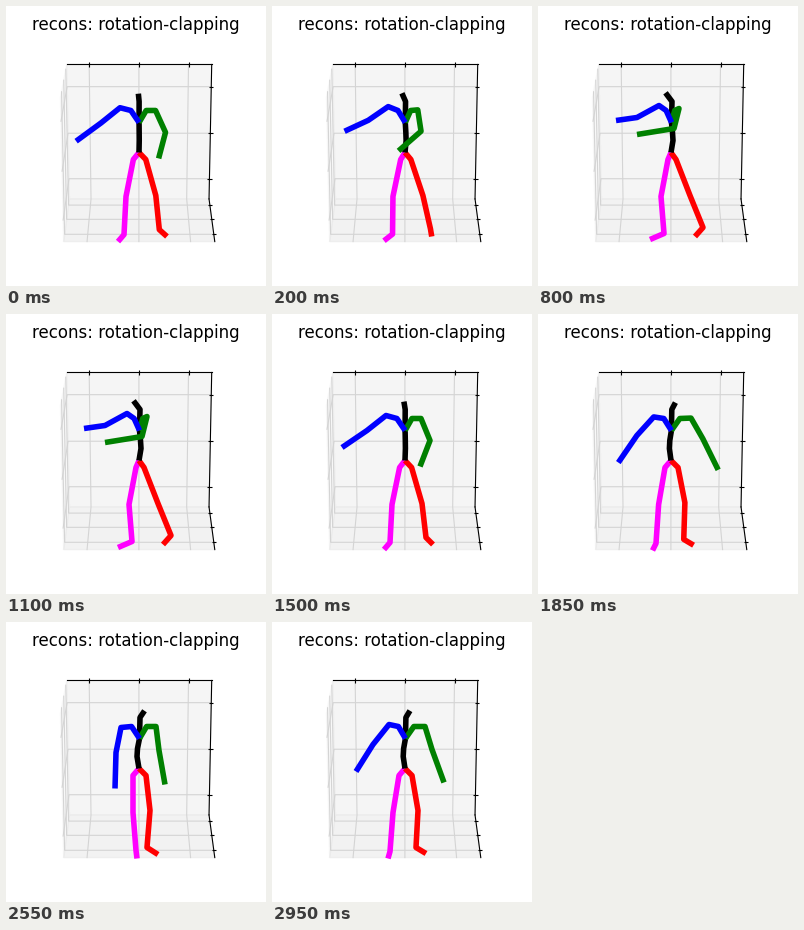
A matplotlib script that plays this animation: 260x280 px, repeating every 3 s.

```python
import numpy as np
import matplotlib.pyplot as plt
from matplotlib.animation import FuncAnimation
from matplotlib.patches import Polygon

W, H, DPI = 260, 280, 100
FRAMES, STEP = 60, 50
TILT = np.radians(20)
TICKS = (0.155, 0.498, 0.84)

plt.rcParams["font.family"] = "DejaVu Sans"
fig = plt.figure(figsize=(W / DPI, H / DPI), dpi=DPI, facecolor="white")
ax = fig.add_axes([0, 0, 1, 1])
ax.set_xlim(0, W)
ax.set_ylim(H - 0.5, -0.5)
ax.axis("off")


def project(u, v, w):
    """Unit box (right, up, towards the viewer) to stage pixels."""
    x, y, z = 1.143 * (u - 0.5), 1.143 * (v - 0.5), 0.857 * (w - 0.5)
    up = y * np.cos(TILT) - z * np.sin(TILT)
    scale = 1295 / (10 - y * np.sin(TILT) - z * np.cos(TILT))
    return 133.2 + x * scale, 144.7 - up * scale


def path(*corners, **style):
    xs, ys = zip(*(project(*c) for c in corners))
    ax.plot(xs, ys, **style)


def pane(gray, *corners):
    shade = (gray, gray, gray, 0.5)
    ax.add_patch(Polygon([project(*c) for c in corners],
                         facecolor=shade, edgecolor=shade, lw=1))


def tick(point, dx, dy):
    x, y = project(*point)
    ax.plot([x - dx, x + dx], [y - dy, y + dy], color="black", lw=0.8,
            solid_capstyle="butt")


def draw_box():
    pane(0.95, (0, 0, 0), (0, 1, 0), (0, 1, 1), (0, 0, 1))
    pane(0.90, (0, 0, 0), (1, 0, 0), (1, 0, 1), (0, 0, 1))
    pane(0.925, (0, 0, 0), (1, 0, 0), (1, 1, 0), (0, 1, 0))
    grid = dict(color="#d4d4d4", lw=0.8)
    for t in TICKS:
        path((t, 1, 0), (t, 0, 0), (t, 0, 1), **grid)
        path((1, t, 0), (0, t, 0), (0, t, 1), **grid)
        path((0, 1, t), (0, 0, t), (1, 0, t), **grid)
    edge = dict(color="black", lw=0.8)
    path((0, 1, 0), (1, 1, 0), **edge)
    path((1, 1, 0), (1, 0, 0), **edge)
    path((1, 0, 0), (1, 0, 1), **edge)
    for t in TICKS:
        tick((t, 1, 0), 0, 2.2)
        tick((1, t, 0), 2.2, 0)
        tick((1, 0, t), 2.2, 0)


def curve(stops, values):
    """Smooth curve through the values, without overshoot."""
    stops, values = np.array(stops, float), np.array(values, float)
    gaps = np.diff(stops)
    rate = (np.diff(values, axis=0).T / gaps).T
    a, b = rate[:-1], rate[1:]
    same = a * b > 0
    inner = np.where(same, 2 * a * b / np.where(same, a + b, 1), 0)
    slope = np.concatenate([rate[:1], inner, rate[-1:]])

    def at(t):
        i = int(np.clip(np.searchsorted(stops, t, "right") - 1, 0, len(gaps) - 1))
        h, s = gaps[i], (t - stops[i]) / gaps[i]
        return ((1 + 2 * s) * (1 - s) ** 2 * values[i]
                + s * (1 - s) ** 2 * h * slope[i]
                + s * s * (3 - 2 * s) * values[i + 1]
                + s * s * (s - 1) * h * slope[i + 1])
    return at


# The whole body follows one swing value through these stages.
HANG, RISE, WIDE, OPEN, CLAP = range(5)
swing = curve([0, 0.45, 0.6, 1.1, 1.5, 1.75, 1.95, 2.15, 2.55, 2.95],
              [2.9, 3.95, CLAP, CLAP, OPEN, WIDE, 0.9, 0.15, HANG, RISE])


def arm_joint(*points):
    return curve([HANG, RISE, WIDE, OPEN, CLAP], points)


def leg_joint(*points):
    return curve([HANG, RISE, OPEN, CLAP], points)


facing = arm_joint(1, 0.9, 0.6, -0.2, -1)

green_arm = (  # shoulder, elbow, hand
    arm_joint((150, 104), (153, 104), (153, 103), (149, 104), (141, 102)),
    arm_joint((153, 128), (160, 127), (169, 121), (158, 126), (136, 122)),
    arm_joint((159, 162), (172, 160), (187, 150), (148, 152), (99, 128)))
blue_arm = (
    arm_joint((115, 105), (117, 102), (114, 103), (114, 101), (121, 99)),
    arm_joint((110, 130), (101, 122), (97, 120), (95, 116), (99, 111)),
    arm_joint((109, 166), (84, 149), (77, 147), (70, 133), (78, 114)))
magenta_leg = (  # knee, ankle, toe
    leg_joint((127, 190), (121, 190), (120, 190), (123, 190)),
    leg_joint((130, 228), (118, 229), (118, 228), (126, 227)),
    leg_joint((131, 236), (116, 236), (112, 235), (112, 233)))
red_leg = (
    leg_joint((144, 188), (146, 188), (150, 189), (152, 189)),
    leg_joint((141, 225), (144, 225), (154, 223), (165, 221)),
    leg_joint((152, 232), (154, 231), (161, 230), (157, 230)))

ROOT = (133, 146)


def spine(turn):
    bend = abs(turn)
    return [ROOT, (133 - 2 * turn, 134), (133 - 1.5 * turn, 126),
            (133 + 0.5 * bend, 116), (133 + bend, 95),
            (133 + 5.5 * turn, 87.3 + turn)]


def arm(joints, chest, s):
    shoulder, elbow, hand = (j(s) for j in joints)
    collar = (chest[0] + 0.43 * (shoulder[0] - chest[0]), 104)
    wrist = elbow + 0.74 * (hand - elbow)
    return [chest, collar, shoulder, elbow, wrist, hand]


def leg(joints, hip_x, s):
    return [ROOT, (hip_x, 153)] + [j(s) for j in joints]


draw_box()
ax.text(130, 24, "recons: rotation-clapping", fontsize=12,
        ha="center", va="baseline", color="black")

COLORS = ("magenta", "red", "black", "green", "blue")
limbs = [ax.plot([], [], color=c, lw=4, solid_capstyle="butt",
                 solid_joinstyle="round", zorder=5)[0] for c in COLORS]


def update(frame):
    s = swing(frame * STEP / 1000)
    turn = facing(s)
    narrow = max(0, -turn)
    back = spine(turn)
    chest = back[3]
    chains = (leg(magenta_leg, 127 + 3 * narrow, s),
              leg(red_leg, 140 - 2 * narrow, s),
              back, arm(green_arm, chest, s), arm(blue_arm, chest, s))
    for line, chain in zip(limbs, chains):
        line.set_data(*np.array(chain, float).T)
    return limbs


anim = FuncAnimation(fig, update, frames=FRAMES, interval=STEP,
                     repeat=True, repeat_delay=0, blit=False)
plt.show()
```
